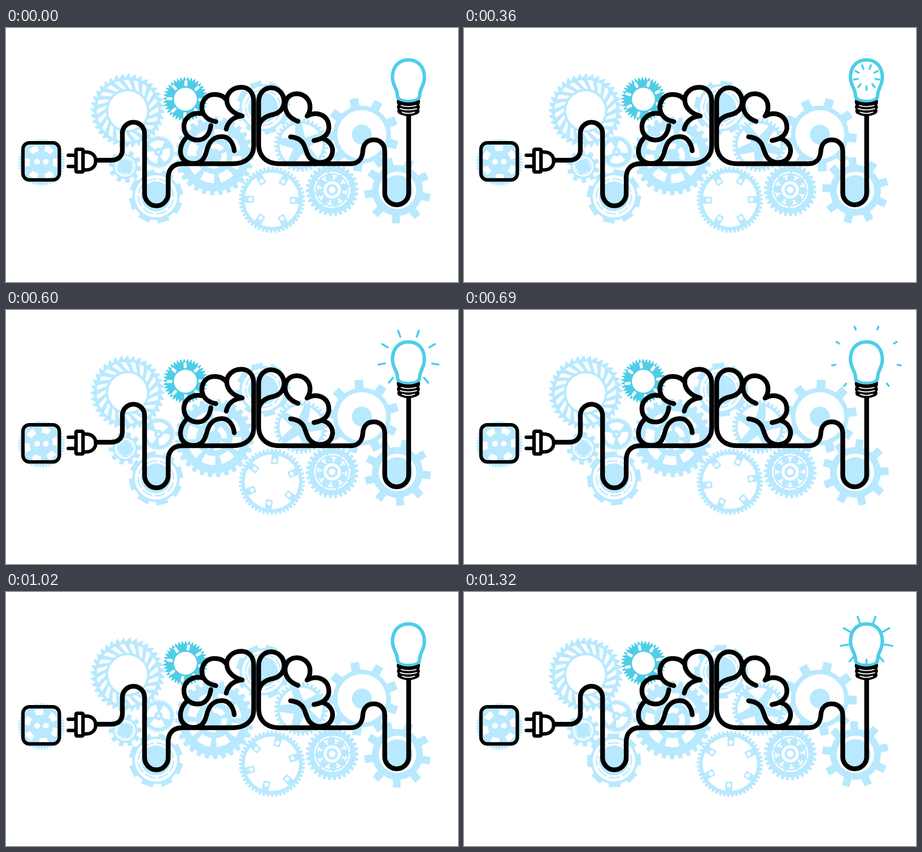
These frames come from a looping animation (907 px wide and 510 px high, 1350 ms). An HTML page:

```html
<!DOCTYPE html>
<html lang="en">
<head>
<meta charset="utf-8">
<title>Brain power</title>
<style>
html, body { margin: 0; width: 100%; height: 100%; overflow: hidden; background: #fff; }
svg { display: block; width: 100vw; height: 100vh; }
.ink { fill: none; stroke: #000; stroke-width: 9.5; stroke-linecap: round; stroke-linejoin: round; }
.thin { stroke-width: 7; }
.glow { fill: none; stroke: #4fcde8; stroke-linecap: round; }
</style>
</head>
<body>
<svg viewBox="0 0 907 510">
  <g id="gears"></g>

  <!-- socket and plug -->
  <g class="ink thin">
    <rect x="34" y="230.5" width="73" height="74.5" rx="13"/>
    <path d="M125 255.5H138M125 278H138"/>
    <path d="M155 249H160C175 249 180 259 180 267C180 276 174 285 160 285H155" fill="#fff"/>
    <rect x="140.5" y="243.5" width="14" height="45.5" rx="2" fill="#fff"/>
  </g>
  <g fill="#fff"><circle cx="62.5" cy="268.5" r="5.8"/><circle cx="80" cy="268.5" r="5.8"/></g>

  <!-- cable and left half of the brain -->
  <g class="ink">
    <path d="M181 265.5H211C226 265.5 233.500 256 233.500 245V210A22.300 22.300 0 0 1 278 210V332A23.700 25 0 0 0 325.500 332V301C325.500 283 336 272.500 353 272.500H455C482 272.500 497 257 497 237V148C497 129 487 119 472 119C455 119 443 131 443 144C443 160 456 172 474 176.500C457 178 445 188 442 203"/>
    <path d="M442 144C436 136 428 133 417 133.500C402 134 393 146 393 160C394 175 404 185 421 188"/>
    <path d="M393 172C374 168 357 180 357 198C357 215 370 225 385 225C400 225 409 212 411 196"/>
    <path d="M362 220C350 232 347 249 353 260C362 275 384 275 394 265C404 255 401 240 411 228C422 215 440 216 448 224C455 231 457 238 458 246.500"/>
  </g>

  <!-- right half of the brain and cable to the bulb -->
  <g class="ink">
    <path d="M507 200V148C507 130 519 119.500 533 120C548 121 558 133 558 148C558 160 550 171 535 174C519 177 507 187 507 202V234C507 256 521 272.500 548 272.500H692C707 272.500 715 262 716 247C717 232 726 224.500 738 224.500C750 224.500 760 233 760 247V331A24 24 0 0 0 808 331V176"/>
    <path d="M586 187.500C570 182 560 170 560 155C561 139 572 131.500 585 132C601 133 611 146 610 160C610 167 607 173 604 177C621 167 640 173 646 188C652 206 644 222 618 226"/>
    <path d="M636 222C653 228 658 242 654 254C650 267 636 272 624 269.500C606 265 604 250 600 240C596 226 586 220 571 218.500"/>
  </g>

  <!-- bulb -->
  <g class="glow">
    <path d="M807.500 64C828 64 839.500 79 839.500 99C839.500 116 830 122 830 135C830 146 818 147.500 807.500 147.500C797 147.500 785.500 146 785.500 135C785.500 122 775.500 116 775.500 99C775.500 79 787 64 807.500 64Z" stroke-width="7"/>
    <path id="rays" stroke-width="4"/>
  </g>
  <path d="M785 144Q807 155 830 144Q832 149 829 154Q832 159 829 163Q831 169 827 172Q807 182 788 172Q784 169 786 163Q783 159 786 154Q783 149 785 144Z"/>
  <path d="M793 155.500Q807 160 823 155.500M791 162Q807 167 824 162M795 169Q807 174 820 169" fill="none" stroke="#fff" stroke-width="2" stroke-linecap="round"/>
</svg>
<script>
const PALE = '#b8e9ff', CYAN = '#4fcde8', FRAME = 30, LOOP = 1350;

const polar = (r, deg) => {
  const a = deg * Math.PI / 180;
  return (r * Math.cos(a)).toFixed(2) + ' ' + (r * Math.sin(a)).toFixed(2);
};
const disc = (r, fill = '#fff') => `<circle r="${r}" fill="${fill}"/>`;
const ring = (r, w, color = '#fff') =>
  `<circle r="${r}" fill="none" stroke="${color}" stroke-width="${w}"/>`;
const bar = (x, y, w, h, rx, fill = '#fff') =>
  `<rect x="${x}" y="${y}" width="${w}" height="${h}" rx="${rx}" fill="${fill}"/>`;

// n copies spread evenly around the hub
const spread = (n, shape) => Array.from({ length: n },
  (_, i) => `<g transform="rotate(${i * 360 / n})">${shape}</g>`).join('');

// base and tip are the tooth widths as shares of one pitch, lean shifts the tip
function teeth(n, r, tipR, base, tip, lean = 0) {
  const step = 360 / n, pts = [];
  for (let i = 0; i < n; i++) {
    const at = (rad, k) => pts.push(polar(rad, (i + k) * step));
    at(r, -base / 2); at(tipR, lean - tip / 2);
    at(tipR, lean + tip / 2); at(r, base / 2);
  }
  return `<path d="M${pts.join('L')}Z"/>`;
}

function sector(r1, r2, half, fill = '#fff') {
  return `<path fill="${fill}" stroke="${fill}" stroke-width="3" stroke-linejoin="round" d="M${polar(r1, -half)}L${polar(r2, -half)}` +
    `A${r2} ${r2} 0 0 1 ${polar(r2, half)}L${polar(r1, half)}A${r1} ${r1} 0 0 0 ${polar(r1, -half)}Z"/>`;
}

const arcs = (n, r, w, half, color) => spread(n,
  `<path fill="none" stroke="${color}" stroke-width="${w}" d="M${polar(r, -half)}A${r} ${r} 0 0 1 ${polar(r, half)}"/>`);

const slant = `<path fill="#fff" d="M${polar(44, 5)}L${polar(62, -7)}L${polar(62, 2)}L${polar(44, 14)}Z"/>`;
const eightTeeth = teeth(8, 48, 55, .62, .56) + ring(40, 5) +
  disc(37.5) + arcs(8, 35, 2.6, 18, PALE) + disc(30, PALE);
const nineTeeth = (r, tipR) => disc(r, PALE) + teeth(9, r - 2, tipR, .46, .33);

// x, y, degrees per frame, starting angle, shapes, colour
const gears = [
  [244, 166, 2.4, 0, teeth(36, 66, 74.5, 1, .14, .25) + spread(20, slant) + disc(39)],
  [360, 143, -2.4, 2, teeth(38, 38, 44.5, .95, .2) + spread(8, bar(26, -3, 12, 6, 2)) + disc(23), CYAN],
  [71, 270, 2.4, 0, teeth(48, 42, 47, .9, .4) + spread(6, sector(25, 34, 13)) + disc(20, PALE)],
  [239, 278, -2.4, 8, teeth(10, 25, 33, .62, .42) + ring(19, 3) + arcs(4, 15, 1.5, 32, '#fff')],
  [306, 249, -4.8, 20, teeth(44, 29, 33, .9, .4) + spread(3, sector(10, 22, 38)) + disc(7, PALE) + disc(2.5)],
  [418, 257, -2.4, 16, teeth(28, 71, 79, .66, .42) + spread(8, sector(38, 53, 14)) + spread(4, sector(16, 24, 30))],
  [301, 338, 2.4, 28, eightTeeth],
  [516, 160, 2.4, 28, eightTeeth],
  [592, 235, -2.4, 47, teeth(36, 48, 54, .7, .42) + disc(43) + teeth(5, 17, 44, 1, .24) + disc(14, PALE)],
  [714, 214, 2.4, 17, nineTeeth(58, 74.5) + disc(49) + disc(20, PALE)],
  [785.5, 326, -2.4, 13, nineTeeth(51, 67) + ring(34, 7)],
  [533.5, 345, 4.8, 1.5, teeth(48, 61, 66.5, .8, .42) + disc(54.5) +
    spread(6, bar(36, -7, 20, 14, 2, PALE) + '<circle cx="43" r="4.2" fill="#fff"/>')],
  [654.5, 325, -2.4, 10, teeth(30, 47, 53, .72, .44) + arcs(8, 35, 3, 20, '#fff') +
    spread(8, bar(21, -2, 8, 4, 1) + bar(27, -5, 3.5, 10, 1)) + ring(14.5, 6) + disc(6.5)]
];

const host = document.getElementById('gears');
host.innerHTML = gears.map(g => `<g fill="${g[5] || PALE}">${g[4]}</g>`).join('');
const nodes = [...host.children];
const rays = document.getElementById('rays');

const ease = k => {
  k = Math.min(1, Math.max(0, k));
  return k * k * (3 - 2 * k);
};

// nine rays slide outward; the inner ends lag and catch up
function drawRays(step) {
  const p = step < 34 ? step - 8 : step - 34;
  if (p <= 0 || p > 20) return rays.setAttribute('d', '');
  const outer = 18 + 53.5 * ease(p / 16.7);
  const inner = 18 + 53.5 * ease((p - 4.4) / 14);
  let d = '';
  for (let a = 90; a < 450; a += 40) {
    if (a === 90 && outer > 60) continue;
    d += `M${polar(inner, a)}L${polar(outer, a)}`;
  }
  const spent = outer - inner < 1.5 && p > 10;
  rays.setAttribute('d', d);
  rays.setAttribute('transform', 'translate(807.7 99)');
  rays.setAttribute('opacity', spent ? .65 : 1);
}

function draw(ms) {
  const step = Math.floor(ms % LOOP / FRAME);
  gears.forEach(([x, y, speed, start], i) =>
    nodes[i].setAttribute('transform', `translate(${x} ${y}) rotate(${start + speed * step})`));
  drawRays(step);
}

const begin = performance.now();
function tick() {
  draw(performance.now() - begin);
  requestAnimationFrame(tick);
}
tick();
</script>
</body>
</html>
```
